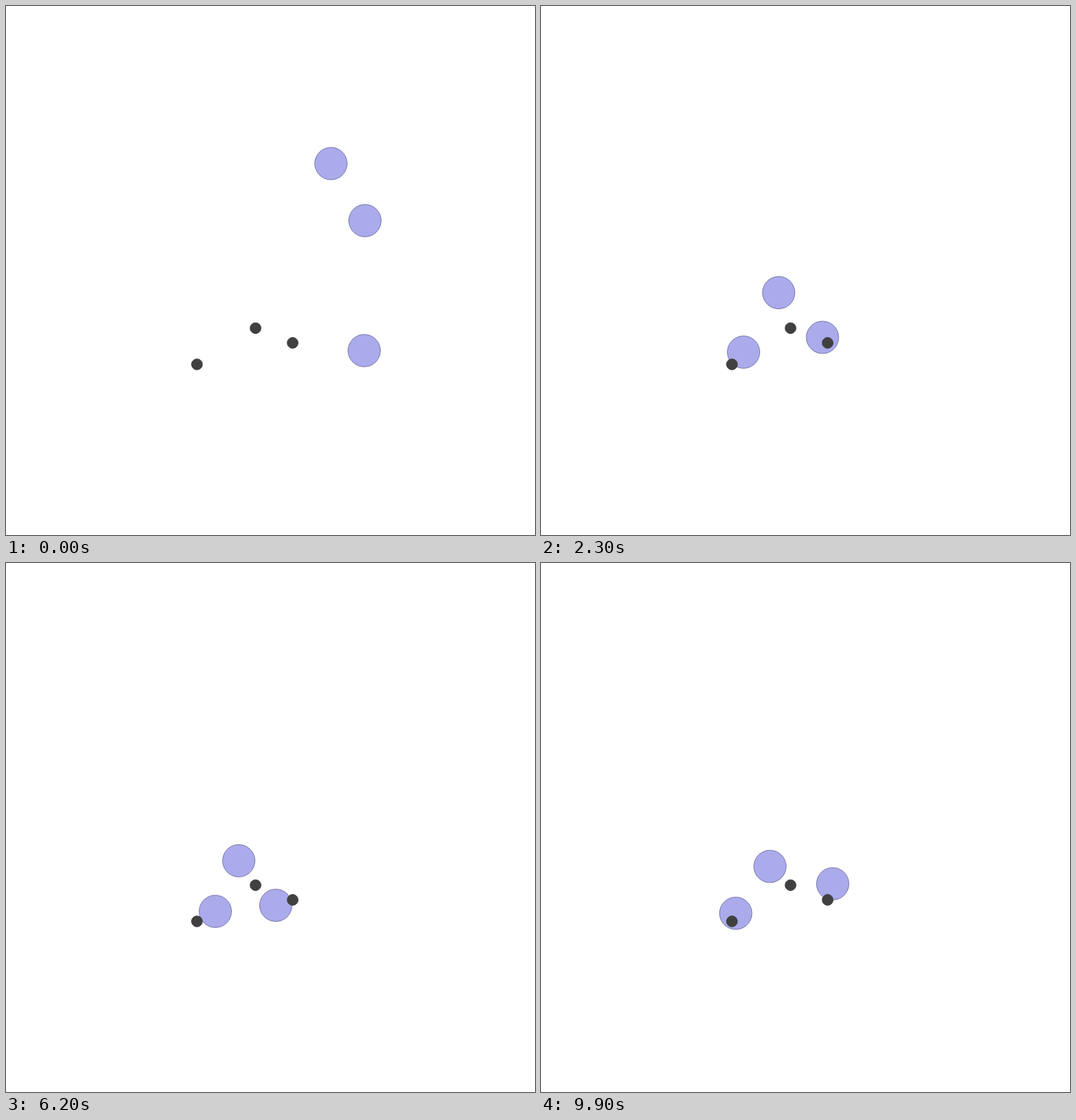
These frames come from a looping animation (700 px wide and 700 px high, 10 s). An HTML page with a canvas:

```html
<!DOCTYPE html>
<html lang="en">
<head>
<meta charset="utf-8">
<title>Agents and landmarks</title>
<style>
  html, body { margin: 0; width: 100%; height: 100%; overflow: hidden; background: #fff; }
  canvas { display: block; }
</style>
</head>
<body>
<canvas id="stage" width="700" height="700"></canvas>
<script>
const ctx = document.getElementById('stage').getContext('2d');
const LOOP = 10000, STEP = 100, UNIT = 143;

const landmarks = [[330.2, 426.3], [379.3, 445.8], [252.7, 474.2]];

// Waypoints of each agent: step, x, y.
const upper = [
  [0, 430, 208.5], [8, 365, 295], [14, 327, 378], [23, 314.5, 379.3], [37, 327, 390],
  [53, 315, 366], [62, 308, 394], [71, 325, 372], [84, 342, 401], [99, 303, 401.5]
];
const right = [
  [0, 475, 284], [8, 426.5, 370.5], [15, 377, 432], [23, 372.5, 438.5], [37, 387.3, 446.2],
  [62, 357, 453], [71, 399, 442], [84, 371, 428], [99, 386, 424.5]
];
const left = [
  [0, 474, 456], [8, 330, 456], [14, 260, 481], [23, 268, 458], [30, 238, 492], [37, 247.3, 476.5],
  [48, 223, 484], [62, 277, 461], [71, 246, 482], [84, 239.8, 496], [99, 257.7, 463.5]
];

// Slope of one axis between waypoint i and the next.
const slope = (path, i, axis) =>
  (path[i + 1][axis] - path[i][axis]) / (path[i + 1][0] - path[i][0]);

// Zero at turning points, so the curve never overshoots a waypoint.
function tangent(path, i, axis) {
  if (i === 0 || i === path.length - 1) return 0;
  const a = slope(path, i - 1, axis), b = slope(path, i, axis);
  return a * b > 0 ? 2 * a * b / (a + b) : 0;
}

function positionAt(path, step) {
  let i = 0;
  while (i < path.length - 2 && path[i + 1][0] <= step) i++;
  const from = path[i], to = path[i + 1];
  const span = to[0] - from[0];
  const u = (step - from[0]) / span, v = 1 - u;
  return [1, 2].map(axis =>
    from[axis] * v * v * (1 + 2 * u) + to[axis] * u * u * (3 - 2 * u)
    + span * u * v * (tangent(path, i, axis) * v - tangent(path, i + 1, axis) * u));
}

function disc([x, y], radius, fill, line) {
  ctx.beginPath();
  for (let i = 0; i < 30; i++) {
    const a = i * Math.PI / 15;
    ctx.lineTo(x + radius * Math.cos(a), y + radius * Math.sin(a));
  }
  ctx.closePath();
  ctx.fillStyle = fill;
  ctx.fill();
  ctx.strokeStyle = line;
  ctx.stroke();
}

function draw(now) {
  const step = Math.floor(now % LOOP / STEP);
  ctx.clearRect(0, 0, 700, 700);
  for (const path of [upper, right, left]) {
    disc(positionAt(path, step), 0.15 * UNIT, 'rgba(89,89,217,.5)', 'rgba(45,45,108,.5)');
  }
  for (const spot of landmarks) disc(spot, 0.05 * UNIT, '#404040', '#404040');
}

const start = performance.now();
function tick() {
  draw(performance.now() - start);
  requestAnimationFrame(tick);
}
tick();
</script>
</body>
</html>
```
